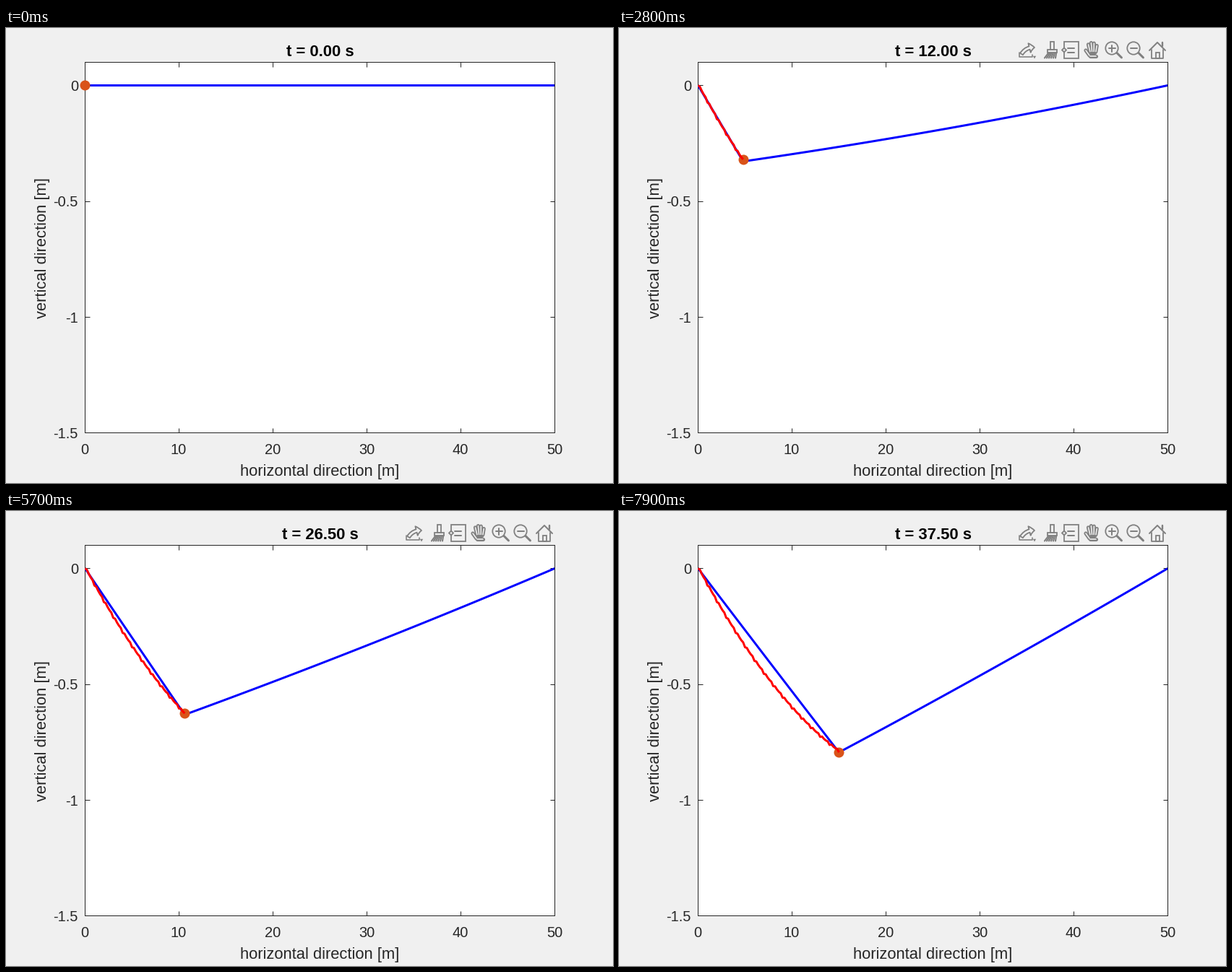
These frames come from a looping animation (840x630 px, 8 s). A matplotlib script:

```python
import numpy as np
import matplotlib.pyplot as plt
from matplotlib.animation import FuncAnimation
from matplotlib.patches import Circle, FancyArrowPatch, Rectangle, RegularPolygon

W, H, DPI = 840, 630, 100
PX = 72 / DPI                      # points per pixel
LEFT, TOP, WIDE, TALL = 109.4, 47.4, 650, 513
PAPER, INK, GREY = "#f0f0f0", "#262626", "#808080"

SPAN, SPEED = 50.0, 0.4            # rope length [m], load speed [m/s]
KINK, WEIGHT = 0.0741, 3.1e-5      # slope jump under the load, own weight
STEP = 0.5                         # node spacing [m]
FRAMES, HOLD, DT = 80, 4, 0.5
TOOLBAR_FROM = 18

plt.rcParams["font.family"] = "Liberation Sans"
plt.rcParams["lines.solid_joinstyle"] = "round"
fig = plt.figure(figsize=(W / DPI, H / DPI), dpi=DPI, facecolor=PAPER)

# chart
x_ticks, y_ticks = np.arange(0, 51, 10), np.arange(0, -1.6, -0.5)
ax = fig.add_axes([LEFT / W, 1 - (TOP + TALL) / H, WIDE / W, TALL / H])
ax.set(xlim=(0, SPAN), ylim=(-1.5, 0.1), xticks=x_ticks, yticks=y_ticks)
ax.tick_params(direction="in", top=True, right=True, length=6.5 * PX, width=PX,
               color=INK, labelbottom=False, labelleft=False)
ax.set_axisbelow(True)
for spine in ax.spines.values():
    spine.set(linewidth=PX, color=INK)


def label(x, y, text, size=22, **kw):
    kw = {"ha": "center", "va": "baseline", "color": INK, **kw}
    return fig.text(x / W, 1 - y / H, text, fontsize=size * PX, **kw)


for v in x_ticks:
    label(LEFT - 0.4 + v * WIDE / SPAN, 590, f"{v}", 20)
for v in y_ticks:
    label(100, 87 - v * TALL / 1.6, f"{v:g}", 20, ha="right")
label(434.5, 620, "horizontal direction [m]")
label(56, 304, "vertical direction [m]", rotation=90, rotation_mode="anchor")
title = label(434.5, 39, "", weight="bold", color="black")

# toolbar, drawn in pixel coordinates
bar = fig.add_axes([0, 0, 1, 1])
bar.set(xlim=(0, W), ylim=(H, 0))
bar.axis("off")


def stroke(x, y, width=2.0, color=GREY):
    bar.plot(x, y, color=color, lw=width * PX, solid_capstyle="round")


def outline(patch, fill="none"):
    patch.set(facecolor=fill, edgecolor=GREY, linewidth=1.8 * PX)
    bar.add_patch(patch)


def export_icon(x):
    outline(FancyArrowPatch((x - 8, 36), (x + 10, 27), shrinkA=0, shrinkB=0,
                            connectionstyle="arc3,rad=-0.3", mutation_scale=10 * PX,
                            arrowstyle="simple,head_length=.7,head_width=1.3,tail_width=.45"))
    stroke([x - 11, x - 11, x + 7, x + 7], [34, 40, 40, 37], 1.6)
    bar.add_patch(RegularPolygon((x + 10, 40), 3, radius=2.5, color=GREY, lw=0))


def brush_icon(x):
    outline(Rectangle((x, 19), 5, 11))
    outline(Rectangle((x - 4, 30), 13, 4))
    for i in range(6):
        stroke([x - 3 + 2.2 * i, x - 8 + 3 * i], [35, 41.5], 2.2)


def tip_icon(x):
    outline(Rectangle((x - 9, 19), 20, 23))
    outline(RegularPolygon((x - 9, 30.5), 4, radius=3), PAPER)
    for y in (28, 33.5):
        stroke([x - 4, x + 5], [y, y])


def hand_icon(x):
    # a wide grey pass, then a narrow light one, leaves the outline
    for width, color in ((5.2, GREY), (1.6, PAPER)):
        for i in range(4):
            tip = 20.5 + 1.4 * (i - 1.3) ** 2
            stroke([x - 5.5 + 3.9 * i, x - 3 + 2.6 * i], [tip, 33], width, color)
        stroke([x - 9, x - 4], [31, 38], width, color)
        stroke([x - 3, x + 5], [39, 39], width, color)
    stroke([x - 2, x + 4], [35, 35], 4)


def lens_icon(x, plus):
    outline(Circle((x, 28), 8.7))
    stroke([x + 7, x + 13.5], [34.5, 41], 3)
    stroke([x - 4.5, x + 4.5], [28, 28])
    if plus:
        stroke([x, x], [23.5, 32.5])


def home_icon(x):
    stroke([x - 11, x, x + 11], [31, 20, 31])
    stroke([x - 8, x - 8, x + 8, x + 8], [30, 42, 42, 30], 1.8)
    outline(Rectangle((x - 2.5, 34), 5, 8))
    stroke([x + 7, x + 7], [20, 25], 2.4)


export_icon(565)
brush_icon(597)
tip_icon(625)
hand_icon(655)
lens_icon(682, True)
lens_icon(712, False)
home_icon(745)

# rope and load
nodes = np.arange(0, SPAN + STEP / 2, STEP)


def point_load(a):
    """Rope shape for the load at position a."""
    return KINK * np.minimum(nodes, a) * (SPAN - np.maximum(nodes, a)) / SPAN


def rope_shape(t):
    """The load is shared by the two nodes next to it."""
    if t == 0:
        return np.zeros_like(nodes)
    cell, share = divmod(SPEED * t / STEP + 1e-9, 1)
    a = cell * STEP
    own = WEIGHT * nodes * (SPAN - nodes)
    return -((1 - share) * point_load(a) + share * point_load(a + STEP) + own)


times = np.arange(FRAMES - HOLD) * DT
xs = SPEED * times
ys = np.array([np.interp(x, nodes, rope_shape(t)) for x, t in zip(xs, times)])

rope, = ax.plot([], [], color="blue", lw=3 * PX, zorder=3, solid_capstyle="butt")
ball, = ax.plot([], [], "o", color="#d95319", ms=14 * PX, mew=0, zorder=4,
                clip_on=False)
trace, = ax.plot([], [], color="red", lw=3 * PX, zorder=5, solid_capstyle="butt")


def draw(i):
    k = max(0, i - HOLD)
    rope.set_data(nodes, rope_shape(times[k]))
    ball.set_data(xs[k:k + 1], ys[k:k + 1])
    trace.set_data(xs[:k + 1], ys[:k + 1])
    title.set_text(f"t = {times[k]:.2f} s")
    bar.set_visible(i >= TOOLBAR_FROM)
    return rope, ball, trace, title, bar


anim = FuncAnimation(fig, draw, frames=FRAMES, interval=100, init_func=lambda: draw(0),
                     repeat=True, repeat_delay=0, blit=False)
plt.show()
```
